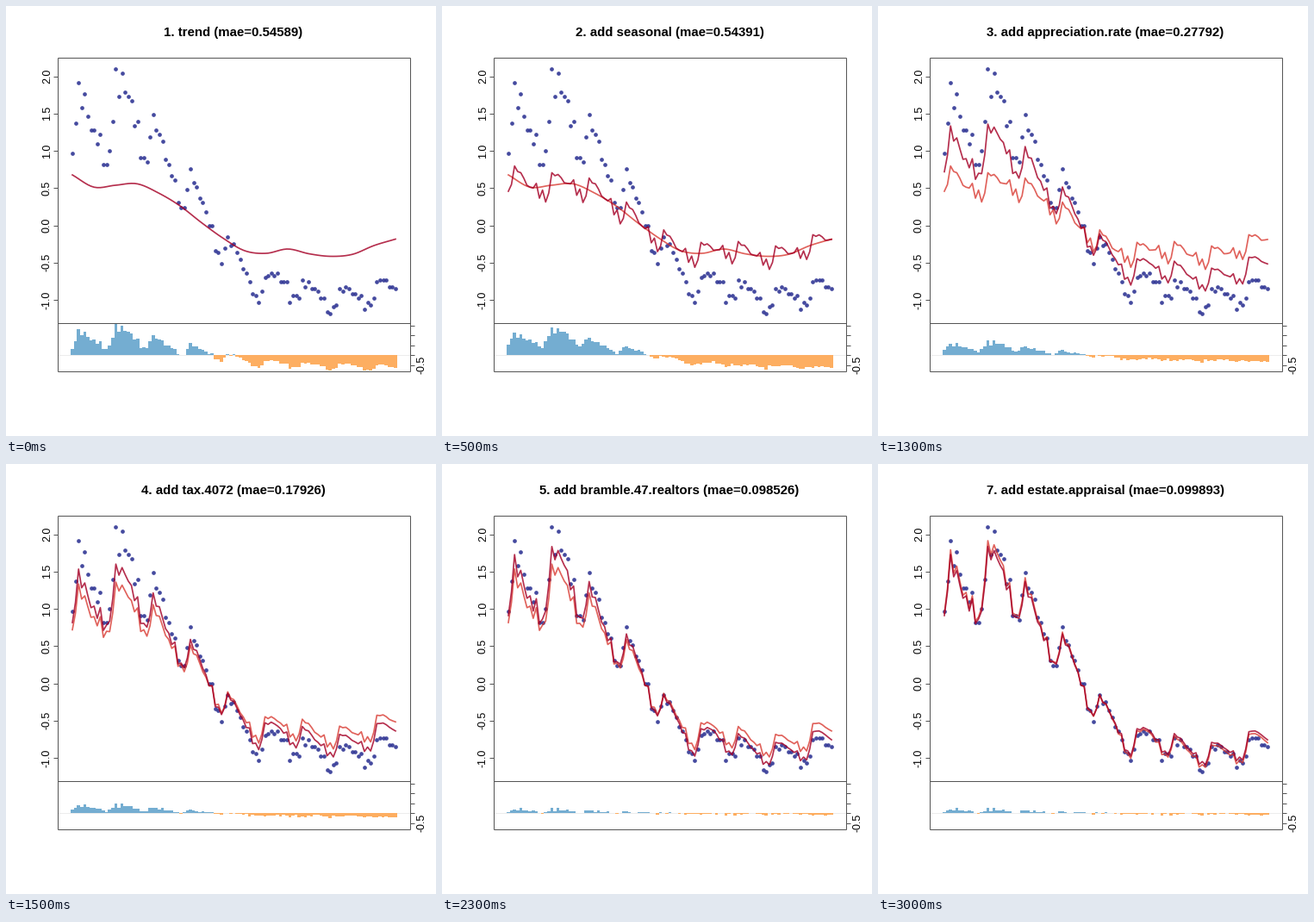
A matplotlib script for the animation above (3500 ms loop, 499 by 499 pixels).

```python
import numpy as np
import matplotlib.pyplot as plt
from matplotlib.animation import FuncAnimation

SIZE, DPI = 499, 64
PT = 72 / DPI  # points per pixel
LEFT, RIGHT, TOP, MID, BOTTOM = 60, 469, 60, 368, 424
ZERO, UNIT = 254.6, 86.5  # main panel scale
BASE, BAR_UNIT = 405, 23  # residual panel scale
PEAK, STEP = 73.2, 2.63  # height of the highest value, grid of the data
DOT, NEW, OLD = "#313695", "#a50026", "#d73027"
ABOVE, BELOW = "#74add1", "#fdae61"

TITLES = [
    "1. trend (mae=0.54589)",
    "2. add seasonal (mae=0.54391)",
    "3. add appreciation.rate (mae=0.27792)",
    "4. add tax.4072 (mae=0.17926)",
    "5. add bramble.47.realtors (mae=0.098526)",
    "6. add real.estate.purchase (mae=0.071291)",
    "7. add estate.appraisal (mae=0.099893)",
]
# How far each later fit has moved from the seasonal to the best one
SHARES = [0.54, 0.74, 0.935, 1, 0.935]

# Half-yearly levels, and the size of each year's swing around them
LEVELS = [38, 44, 35.5, 28, 39, 52, 60, 70, 83.5, 91.5,
          102, 97, 101.5, 105, 106, 105, 104, 101, 99]
SWINGS = [30, 27, 21, 17, 12, 10.5, 10.5, 9.5, 11.5]
# Shape of a year, in the first and in the last one
YEAR_START = [0, -0.4, -1, -0.68, -0.82, -0.62,
              -0.45, -0.45, -0.15, -0.3, 0.12, 0.12]
YEAR_END = [0, -0.38, -1, -1, -0.95, -0.85,
            -0.72, -0.58, -0.45, -0.48, 0, -0.15]
SEASON = [19, 9, -15, -11, -12, -7.5, -1, 0, 0.5, -5, 13, 4]
TREND = [196, 210.2, 208, 206.3, 217, 232, 251.5, 269.5,
         284, 287, 282, 287.6, 290.5, 288.2, 278, 270.5]

n = 105
month = np.arange(n)
age = month / (n - 1)
xs = 77 + 375 * age


def smooth_curve(keys):
    """Cubic curve through evenly spaced keys, one value per month."""
    keys = np.array(keys)
    slopes = np.gradient(keys)
    pos = age * (len(keys) - 1)
    k = np.minimum(pos.astype(int), len(keys) - 2)
    t = pos - k
    ease = t * t * (3 - 2 * t)
    return (keys[k] + ease * (keys[k + 1] - keys[k])
            + t * (1 - t) ** 2 * slopes[k]
            - t * t * (1 - t) * slopes[k + 1])


def yearly(gain):
    """Levels plus a yearly swing, counted in steps below the peak."""
    level = np.interp(month, 6 * np.arange(len(LEVELS)), LEVELS)
    start, end = (np.array(p)[month % 12] for p in (YEAR_START, YEAR_END))
    shape = start + age * (end - start)
    return level + gain * np.array(SWINGS)[month // 12] * shape


rng = np.random.default_rng(4)
noise = rng.normal(0, 1.2, n)
observed = PEAK + STEP * np.maximum(0, np.round(
    yearly(np.linspace(1.2, 0.8, n)) + noise))
best = PEAK + STEP * yearly(1)
trend = smooth_curve(TREND)
seasonal = trend + np.array(SEASON)[month % 12] * (1 - 0.25 * age)
fits = [trend, seasonal] + [seasonal + s * (best - seasonal) for s in SHARES]

plt.rcParams["font.family"] = "Liberation Sans"
fig = plt.figure(figsize=(SIZE / DPI, SIZE / DPI), dpi=DPI, facecolor="white")
ax = fig.add_axes([0, 0, 1, 1])
ax.set_xlim(0, SIZE)
ax.set_ylim(SIZE, 0)
ax.axis("off")


def segment(x, y, color="#555555", z=5):
    ax.plot(x, y, color=color, lw=PT, zorder=z, snap=True,
            solid_capstyle="butt")


def side_label(x, y, text):
    ax.text(x, y, text, size=12.5 * PT, rotation=90, rotation_mode="anchor",
            ha="center", va="baseline", color="black")


def draw_panels():
    for y in (TOP, MID, BOTTOM):
        segment([LEFT, RIGHT], [y, y])
    for x in (LEFT, RIGHT):
        segment([x, x], [TOP, BOTTOM])
    for value in np.arange(-1, 2.1, 0.5):
        y = ZERO - UNIT * value
        segment([LEFT - 5, LEFT], [y, y])
        side_label(51, y, f"{value:.1f}")
    for value in np.arange(-0.5, 1.6, 0.5):
        y = BASE - BAR_UNIT * value
        segment([RIGHT, RIGHT + 5], [y, y])
    side_label(486, BASE + BAR_UNIT / 2, "-0.5")
    segment([LEFT, RIGHT], [BASE, BASE], "#ececec", 1)


draw_panels()
ax.scatter(xs, observed, s=(4.7 * PT) ** 2, color=DOT, lw=0, alpha=0.9,
           zorder=2)
old_line, = ax.plot([], [], color=OLD, lw=1.7 * PT, alpha=0.76, zorder=3)
new_line, = ax.plot([], [], color=NEW, lw=1.7 * PT, alpha=0.82, zorder=4)
bars = ax.bar(xs, np.zeros(n), width=xs[1] - xs[0], bottom=BASE, lw=0,
              antialiased=False, zorder=2)
title = ax.text(264, 35, "", size=15 * PT, weight="bold", ha="center",
                va="baseline", color="black")


def update(i):
    title.set_text(TITLES[i])
    new_line.set_data(xs, fits[i])
    if i:
        old_line.set_data(xs, fits[i - 1])
    else:
        old_line.set_data([], [])
    heights = (observed - fits[i]) * BAR_UNIT / UNIT
    for bar, height in zip(bars, heights):
        bar.set_height(height)
        bar.set_facecolor(ABOVE if height < 0 else BELOW)
    return [title, old_line, new_line, *bars]


anim = FuncAnimation(fig, update, frames=len(TITLES), interval=500,
                     repeat=True, repeat_delay=0)
plt.show()
```
